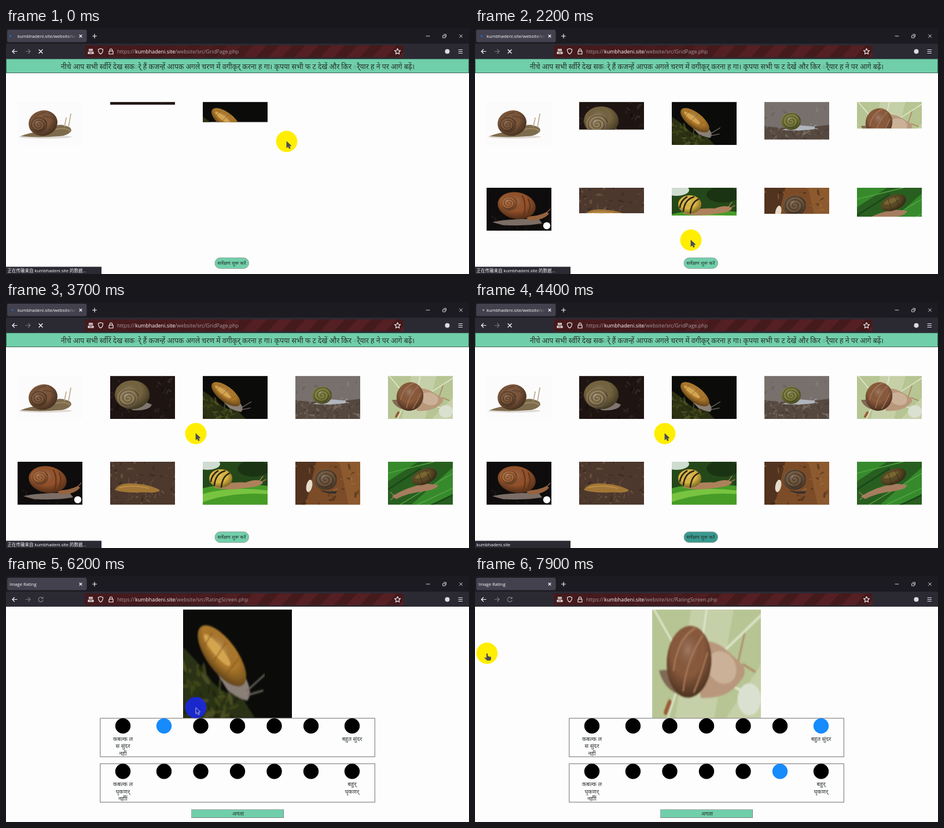
These frames come from a looping animation (800x425 px, 8 s). An HTML page:

```html
<!DOCTYPE html>
<html lang="hi">
<head>
<meta charset="utf-8">
<title>Image Rating</title>
<style>
html, body { margin: 0; width: 100%; height: 100%; overflow: hidden; background: #fefdfe; }
#stage { display: block; width: 800px; height: 425px; }
text { font-family: "Noto Sans Devanagari", "Noto Sans", "Open Sans", sans-serif; fill: #26302c; }
.ui, .ui text { font-family: "Open Sans", "Noto Sans CJK SC", "Noto Sans CJK", sans-serif; fill: #fbfbfe; }
.ui .dim { fill: #a49a9f; }
.icon { fill: none; stroke: #fbfbfe; stroke-width: 1.1; stroke-linecap: round; stroke-linejoin: round; }
.mid { text-anchor: middle; }
</style>
</head>
<body>
<svg id="stage" viewBox="0 0 800 425">
  <defs>
    <radialGradient id="shade" cx=".42" cy=".35" r=".7">
      <stop offset="0" stop-color="#fff" stop-opacity=".2"/>
      <stop offset=".5" stop-color="#000" stop-opacity="0"/>
      <stop offset="1" stop-color="#000" stop-opacity=".5"/>
    </radialGradient>
    <linearGradient id="tabFade">
      <stop offset="0" stop-color="#42414d" stop-opacity="0"/>
      <stop offset="1" stop-color="#42414d"/>
    </linearGradient>
    <pattern id="stripes" width="45" height="20" patternUnits="userSpaceOnUse" patternTransform="translate(22 30) skewX(-42)">
      <rect width="23" height="20" fill="#552023"/>
    </pattern>
    <linearGradient id="barFade">
      <stop offset="0" stop-color="#451a1d"/>
      <stop offset=".38" stop-color="#451a1d" stop-opacity=".7"/>
      <stop offset=".55" stop-color="#451a1d" stop-opacity="0"/>
    </linearGradient>
    <filter id="soft" x="0" y="0" width="1" height="1">
      <feGaussianBlur stdDeviation=".6"/>
    </filter>
    <g id="shell">
      <circle r="1" fill="currentColor"/>
      <circle r="1" fill="url(#shade)"/>
      <path id="spiral" fill="none" stroke="#000" stroke-opacity=".35" stroke-width=".09"/>
    </g>
  </defs>

  <rect width="800" height="425" fill="#fefdfe"/>

  <g id="grid">
    <rect x=".5" y="53.5" width="799" height="24" fill="#70cfaa" stroke="#3f6656"/>
    <text class="mid" x="400.5" y="70.5" font-size="12.3">नीचे आप सभी र्स्वीरें देख सकर्े हैं कजन्हें आपक अगले चरण में वगीकृर् करना ह गा। कृपया सभी फ ट देखें और किर र्ैयार ह ने पर आगे बढ़ें।</text>
    <g id="thumbs"></g>
    <rect id="start" x="361" y="397" width="58.5" height="18.5" rx="9" fill="#70cfaa" stroke="#93a39c"/>
    <text class="mid" x="390" y="409" font-size="8.4">सर्वेक्षण शुरू करें</text>
  </g>

  <g id="rating">
    <use id="photo" x="306" y="58" width="188" height="187.5"/>
    <g id="scales"></g>
    <rect x="320.5" y="403.5" width="159" height="14" fill="#70cfaa" stroke="#a5aaa8"/>
    <path d="M320 417.5H479.5V403" fill="none" stroke="#7d8884"/>
    <text class="mid" x="401" y="413.5" font-size="9">अगला</text>
  </g>

  <g class="ui">
    <rect width="800" height="27" fill="#1c1b22"/>
    <rect y="27" width="800" height="26" fill="#2b2a33"/>
    <rect x="2" y="3" width="137.5" height="21.5" rx="3" fill="#42414d"/>
    <circle id="dot" cy="14" r="1.5"/>
    <text id="title" y="17" font-size="7.7"></text>
    <rect x="104" y="5" width="19" height="17" fill="url(#tabFade)"/>
    <rect x="123" y="5" width="14" height="17" fill="#42414d"/>
    <g class="icon">
      <path d="M127 12l4 4m0-4l-4 4M149.5 14h7m-3.5-3.5v7"/>
      <path d="M726 14h6M755 13h4v4h-4zM756.5 11h4v4M783.500 11.500l5 5m0-5l-5 5" stroke-width=".8"/>
      <path d="M19 40.500h-8m3.500-3.500l-3.500 3.500l3.500 3.500"/>
      <path d="M34 40.500h8m-3.500-3.500l3.500 3.500l-3.500 3.500" stroke="#77767f"/>
      <path id="stop" d="M57 37.500l6 6m0-6l-6 6" stroke-width="1.300"/>
      <path id="reload" d="M63.500 38.500a4 4 0 1 0 .4 3.500M64 36.500v2.500h-2.500" stroke="#85848d"/>
    </g>
    <rect x="136" y="30" width="551" height="20.500" rx="3" fill="#451a1d"/>
    <rect x="136" y="30" width="551" height="20.500" rx="3" fill="url(#stripes)"/>
    <rect x="136" y="30" width="551" height="20.500" rx="3" fill="url(#barFade)"/>
    <path d="M143 36h7v4h-7zM141.500 41h10v4h-10z" fill="#ddd5d7"/>
    <path d="M144.500 37.500h1.300v1.300h-1.300zM147.300 37.500h1.300v1.300h-1.300zM144 42.500h5v1h-5z" fill="#451a1d"/>
    <g class="icon">
      <path d="M163.500 35.500l4 1.500c0 4-1 6.500-4 8c-3-1.500-4-4-4-8z"/>
      <path d="M178 40h7v5h-7zM179.500 40v-2a2 2 0 0 1 4 0v2"/>
      <path d="M676.500 35.500l1.500 3.200l3.500.400l-2.600 2.400l.700 3.500l-3.100-1.700l-3.100 1.700l.700-3.500l-2.600-2.400l3.500-.400z"/>
      <path d="M782 37.500h6.500M782 40.500h6.500M782 43.500h6.500" stroke-width=".9"/>
    </g>
    <circle cx="762.500" cy="40.500" r="4" fill="#dcdbe2"/>
    <text y="43.500" font-size="8.900"><tspan class="dim" x="192">https://</tspan><tspan x="223">kumbhadeni.site</tspan><tspan id="path" class="dim" x="292"></tspan></text>
    <g id="status">
      <rect y="412.500" width="165" height="12.500" fill="#2b2a33"/>
      <text id="note" x="2.500" y="422" font-size="7.500"></text>
    </g>
  </g>

  <g id="cursor">
    <circle id="halo" r="18.400"/>
    <path id="arrow" d="M0 0v11l2.600-2.400l1.800 3.900l1.900-.900l-1.800-3.700l3.400-.300z" stroke-width=".8"/>
    <path id="hand" fill="#4a4a58" d="M-1 1q1.300-1.500 2.400 0v4l5 1.300q1 .5.900 2l-1.200 4.200h-6l-4.400-4.500q.400-1.600 3.300.300z"/>
  </g>
</svg>

<script>
const LOOP = 8000, HOST = "kumbhadeni.site";
const $ = id => document.getElementById(id);
const set = (el, attrs) => { for (const k in attrs) el.setAttribute(k, attrs[k]); };
const show = (id, on) => { $(id).style.display = on ? "" : "none"; };
const lerp = (a, b, p) => a + (b - a) * Math.min(1, Math.max(0, p));

// Picture helpers, in a 112 x 75 space
const fill = (d, color) => `<path d="${d}" fill="${color}"/>`;
const line = (d, color, w) =>
  `<path d="${d}" fill="none" stroke="${color}" stroke-width="${w}" stroke-linecap="round"/>`;
const oval = (x, y, rx, ry, color, turn = 0) =>
  `<ellipse rx="${rx}" ry="${ry}" fill="${color}" transform="translate(${x} ${y}) rotate(${turn})"/>`;
const ball = (x, y, rx, ry, color, turn) =>
  oval(x, y, rx, ry, color, turn) + oval(x, y, rx, ry, "url(#shade)", turn);
const shell = (x, y, rx, ry, color, turn = 0) =>
  `<use href="#shell" color="${color}" transform="translate(${x} ${y}) rotate(${turn}) scale(${rx} ${ry})"/>`;

// Seeded litter, moss and grain
function specks(seed, n, colors, y0 = 0, x1 = 112) {
  const rnd = () => (seed = (seed * 16807) % 2147483647) / 2147483647;
  let out = "";
  for (let i = 0; i < n; i++)
    out += oval(rnd() * x1, y0 + rnd() * (75 - y0), 1 + rnd() * 5, .6 + rnd() * 1.6,
      colors[i % colors.length], rnd() * 180);
  return `<g opacity=".5">${out}</g>`;
}

// Each picture: background colour, then its shapes
const pictures = [
  ["#fcfbfc",
    oval(48, 61, 46, 3, "#dedad6") +
    fill("M5 60Q20 53 40 52L62 45Q70 37 84 42Q93 44 93 50Q88 59 70 60Q40 63 5 60z", "#7d6b4d") +
    line("M66 48Q80 44 90 50", "#9c8862", 2) +
    line("M81 43L84 28M88 44L92 21", "#b9a688", 1.6) +
    ball(44, 37, 25, 22, "#7b5539", -12) + shell(36, 40, 15, 14, "#7f593c") +
    line("M30 28Q36 20 48 18M44 26Q56 24 64 32M54 52Q56 42 65 36", "#54382a", 1)],
  ["#1e1513",
    specks(11, 60, ["#3a2a24", "#110b0a", "#4b3a30"]) +
    fill("M30 55Q50 58 62 46L72 50Q68 61 40 60z", "#80766f") +
    ball(38, 33, 30, 25, "#75643f") + shell(31, 39, 19, 17, "#93805a")],
  ["#0b0c09",
    fill("M0 26Q18 38 28 48T60 60L74 75H0z", "#2c3114") +
    specks(23, 55, ["#515c1c", "#1d210d", "#6a6b2e"], 38, 58) +
    fill("M33 42Q52 42 65 48Q72 58 66 63Q56 61 46 56z", "#8b8078") +
    line("M66 56L84 45M67 59L82 56", "#756c66", 1.2) +
    ball(40, 32, 30, 13, "#ad782b", 38) + oval(35, 28, 17, 4, "#d3a550", 38) +
    line("M22 25L30 16M31 36L44 23M44 45L57 34", "#85561f", .8)],
  ["#77706d",
    fill("M0 42Q40 50 112 40V75H0z", "#55483f") +
    specks(37, 60, ["#8c8178", "#41342d", "#6d5a4b"], 44) +
    specks(41, 18, ["#625d5b", "#8b8582"]) +
    fill("M30 49Q46 44 62 41L86 43Q90 46 84 48L60 50z", "#b0b6bd") +
    line("M84 44L90 40M85 46L92 47", "#aeb8c5", 1) +
    shell(46, 34, 17, 15, "#80803f")],
  ["#c6d0a8",
    fill("M0 0H40L24 75H0zM84 0H112V38L76 75H64z", "#b6c593") +
    line("M2 0L34 38L112 62M34 38L16 75M56 0L52 20M112 4L72 30", "#e2e7cf", 1.6) +
    oval(100, 62, 12, 11, "#dbe1d0") +
    fill("M7 42Q28 40 40 48L32 60Q12 56 7 42z", "#806954") +
    fill("M44 24Q62 18 80 30L93 38Q99 44 90 50Q78 62 50 61z", "#b8977b") +
    oval(72, 40, 15, 11, "#cbb197", 15) +
    line("M89 35L95 17M94 38L106 43", "#b18464", 1.6) +
    ball(38, 36, 23, 25, "#8a5a3c", 18) +
    line("M22 42Q26 20 44 13M32 56Q36 34 52 18M43 57Q50 46 57 30", "#ac7e5c", 1.2) +
    line("M18 64L14 71", "#9b5a35", 4)],
  ["#0e0c0c",
    specks(53, 35, ["#28201d", "#191514"], 48) +
    fill("M10 60Q30 54 90 54L96 62Q70 67 28 65z", "#7b6e66") +
    fill("M66 50Q90 50 104 42L108 45Q98 57 74 57z", "#96633f") +
    line("M103 44L110 37", "#a06c47", 1.2) +
    ball(52, 31, 33, 23, "#94522b", 10) + shell(38, 27, 15, 13, "#a9673a") +
    line("M62 14Q70 30 64 48M72 20Q78 32 72 44", "#5c331b", 2) +
    oval(104, 66, 6.2, 6.2, "#fff")],
  ["#4c382d",
    specks(67, 75, ["#6b4d3b", "#30211b", "#826552"]) +
    fill("M8 49Q16 35 44 38Q70 40 86 49Q84 55 60 53Q24 55 8 49z", "#a17636") +
    line("M16 45Q38 39 66 46", "#c2954c", 1.6)],
  ["#25481a",
    oval(8, 4, 22, 10, "#cfdcd0") + oval(88, 12, 28, 14, "#1a3413") +
    fill("M0 46Q50 34 112 42V75H0z", "#479c28") +
    fill("M0 56Q50 42 112 50V56Q50 52 0 70z", "#78c440") +
    fill("M18 45Q44 34 74 36Q96 28 104 36Q100 43 78 45Q46 51 18 45z", "#ad815b") +
    line("M98 33L104 25M101 35L109 31", "#b98a60", 1.2) +
    ball(31, 29, 20, 16, "#dcb741") +
    line("M20 41Q22 20 38 16M32 44Q34 25 46 20M14 34Q16 22 26 16", "#2d2415", 2.6)],
  ["#7c4c28",
    fill("M0 0H36L18 75H0z", "#51331f") + fill("M76 0H112V75H92z", "#8c5a2e") +
    specks(83, 40, ["#5c3418", "#a9713d", "#3a2315"]) +
    oval(24, 42, 5, 11, "#e6dccb", 12) +
    fill("M42 49Q60 54 72 50L70 55Q54 57 42 49z", "#33302f") +
    shell(52, 31, 20, 18, "#725840")],
  ["#285f20",
    fill("M0 0H52L0 34zM112 10V60L70 75H40z", "#368a2c") +
    line("M0 20L80 0M20 75L112 20M50 75L112 46", "#55a843", 1.4) +
    line("M0 48L56 12M76 75L112 58", "#1a4919", 3) +
    fill("M7 60Q32 44 64 38L86 40Q88 47 64 51Q34 54 14 65z", "#a67c5e") +
    line("M11 59L4 53M11 61L5 66", "#b18665", 1.2) +
    ball(63, 26, 23, 13, "#5b4a25", -22) + oval(59, 23, 13, 4, "#79662f", -22) +
    line("M54 20L60 38M66 15L73 32", "#3a2e19", .9)]
];

$("spiral").setAttribute("d", Array.from({ length: 70 }, (_, i) => {
  const a = i * .27, r = i / 70 * .97;
  return (i ? "L" : "M") + (r * Math.cos(a)).toFixed(3) + " " + (r * Math.sin(a)).toFixed(3);
}).join(""));

document.querySelector("defs").insertAdjacentHTML("beforeend", pictures.map(([bg, art], i) =>
  `<symbol id="pic${i}" viewBox="0 0 112 75" preserveAspectRatio="none">
    <rect width="112" height="75" fill="${bg}"/><g filter="url(#soft)">${art}</g></symbol>`).join(""));

$("thumbs").innerHTML = pictures.map((_, i) =>
  `<svg x="${20 + i % 5 * 160}" y="${i < 5 ? 127.5 : 276}" width="112" height="0"><use href="#pic${i}" width="112" height="74.5"/></svg>`).join("");

const choices = [202, 273, 336.5, 400, 463.5, 527, 598];
const label = (x, y, lines) => lines.map((s, i) =>
  `<text class="mid" x="${x}" y="${y + i * 12.5}" font-size="9.8">${s}</text>`).join("");
const scale = (y, low, high) =>
  `<rect x="162.8" y="${y}" width="474.5" height="66.5" fill="none" stroke="#707070"/>` +
  choices.map(x => `<circle cx="${x}" cy="${y + 13.2}" r="13.2"/>`).join("") +
  label(202, y + 39, low) + label(598, y + 39, high);
$("scales").innerHTML =
  scale(245.8, ["कबल्क ल", "स सुंदर", "नहीं"], ["बहुत सुंदर"]) +
  scale(324.3, ["कबल्क ल", "घृकणर्", "नहीीं"], ["बहुर्", "घृकणर्"]);

const thumbs = [...$("thumbs").children];
const dots = [...$("scales").querySelectorAll("circle")];

// Loaded heights at the start and at 1.5 s
const loaded = [[75, 75], [5, 11], [35, 75], [0, 50], [0, 6], [0, 75], [0, 0], [0, 10], [0, 3], [0, 16]];
// Rating screens: start, picture, [choice, time] per scale, time of leaving
const screens = [
  { at: 4600, pic: 0, picks: [[6, 4900], [0, 5100]], leave: 5300 },
  { at: 5600, pic: 2, picks: [[1, 6100], [6, 6400]], leave: 6700 },
  { at: 6900, pic: 4, picks: [[6, 7300], [5, 7600]], leave: LOOP }
];

function pointer(t) {
  if (t < 1400) return [lerp(485, 470, t / 1400), lerp(196, 450, (t - 500) / 900)];
  if (t < 6900) return [lerp(400, 328, (t - 1900) / 800), lerp(450, 227.3, (t - 1900) / 800)];
  const p = (t - 6900) / 600;
  return [lerp(328, 20.7, p), lerp(227.3, 133.5, p)];
}

function draw(t) {
  const screen = screens.filter(s => t >= s.at).pop();
  const loading = !screen || t >= screen.leave;
  const waiting = t >= 4300;
  show("grid", !screen);
  show("rating", screen);

  if (screen) {
    $("photo").setAttribute("href", "#pic" + screen.pic);
    dots.forEach((dot, i) => {
      const [choice, at] = screen.picks[i < 7 ? 0 : 1];
      dot.setAttribute("fill", i % 7 === choice && t >= at ? "#168bfb" : "#000");
    });
  } else {
    thumbs.forEach((el, i) => {
      const [a, b] = loaded[i];
      const h = t < 1500 ? lerp(a, b, t / 1500) : lerp(b, 75, (t - 1500) / 1200);
      el.setAttribute("height", Math.min(74.5, Math.round(h)));
    });
    $("start").setAttribute("fill", t >= 4200 ? "#38998f" : "#70cfaa");
  }

  $("title").textContent = screen ? "Image Rating" : HOST + "/website/src/";
  $("title").setAttribute("x", loading ? 20 : 6);
  $("path").textContent = "/website/src/" + (screen ? "RatingScreen.php" : "GridPage.php");
  $("note").textContent = waiting ? HOST : `正在传输来自 ${HOST} 的数据...`;
  show("status", loading);
  show("stop", loading);
  show("reload", !loading);
  show("dot", loading);
  set($("dot"), {
    cx: 11 - 3.5 * Math.cos(2 * Math.PI * t * 7 / 1500),
    fill: waiting ? "#9d9ca6" : "#1676ee"
  });

  const [x, y] = pointer(t);
  const inverted = screen === screens[1], last = screen === screens[2];
  $("cursor").setAttribute("transform", `translate(${x} ${y})`);
  set($("halo"), { fill: inverted ? "#1727ed" : "#ffee00", opacity: inverted ? .85 : 1 });
  set($("arrow"), { fill: inverted ? "none" : "#4a4a58", stroke: inverted ? "#d8d8c8" : "#4a4a58" });
  show("arrow", !last);
  show("hand", last);
}

function tick() {
  draw(Math.floor(performance.now() % LOOP / 100) * 100);
  requestAnimationFrame(tick);
}
tick();
</script>
</body>
</html>
```
